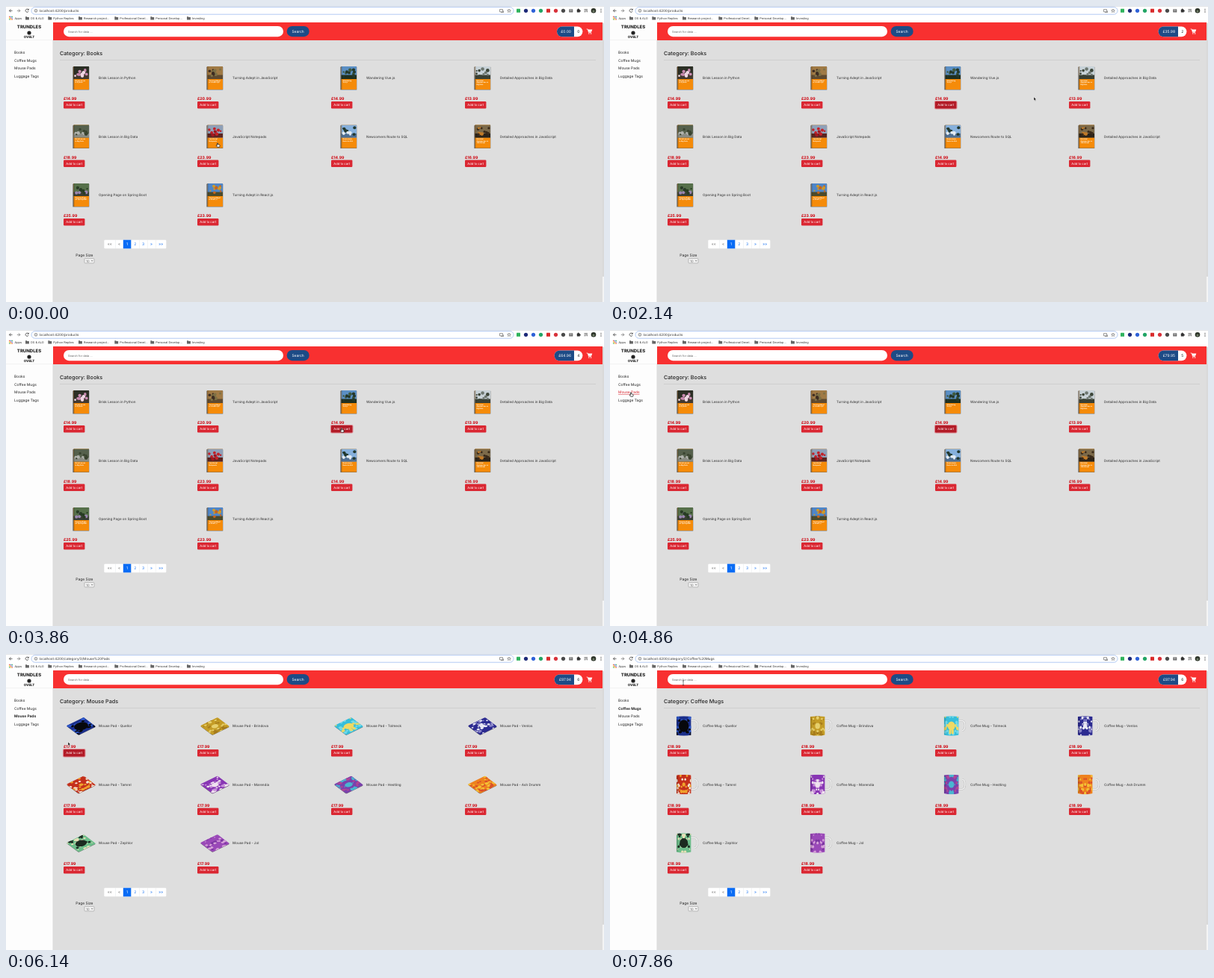
These frames come from a looping animation (800 by 397 pixels, 8 s). An HTML page:

```html
<!DOCTYPE html>
<html lang="en">
<head>
<meta charset="utf-8">
<title>Shop</title>
<style>
html, body { margin: 0; width: 100%; height: 100%; overflow: hidden; background: #fff; }
svg { display: block; width: 800px; height: 397px; }
text { font-family: Inter, "Open Sans", sans-serif; text-rendering: geometricPrecision; white-space: pre; }
</style>
</head>
<body>
<svg viewBox="0 0 800 397" xmlns="http://www.w3.org/2000/svg">
  <defs id="defs"></defs>
  <g id="chrome"></g>
  <g id="scene"></g>
</svg>
<script>
const $ = id => document.getElementById(id);
const text = (x, y, s, size, fill = '#222', more = '') =>
  `<text x="${x}" y="${y}" font-size="${size}" fill="${fill}" ${more}>${s.replace(/&/g, '&amp;').replace(/</g, '&lt;')}</text>`;
const rect = (x, y, w, h, fill, rx = 0, more = '') =>
  `<rect x="${x}" y="${y}" width="${w}" height="${h}" rx="${rx}" fill="${fill}" ${more}/>`;
const circle = (x, y, r, fill, more = '') => `<circle cx="${x}" cy="${y}" r="${r}" fill="${fill}" ${more}/>`;
const line = (d, stroke, w) => `<path d="${d}" fill="none" stroke="${stroke}" stroke-width="${w}"/>`;
const mid = 'text-anchor="middle"', bold = 'font-weight="700"';

let seed = 7;
const rnd = (a = 0, b = 1) => {
  seed = (seed * 16807) % 2147483647;
  return a + (b - a) * seed / 2147483647;
};

// title, price, then cover colours: sky, ground, foliage, focus
const books = [
  ['Brisk Lesson in Python', 14.99, '#2c2f25', '#43392f', '#c98bb0', '#f0d8e4'],
  ['Turning Adept in JavaScript', 20.99, '#a07a45', '#5f4a30', '#7d7045', '#3d2c22'],
  ['Wandering Vue.js', 14.99, '#5b8fc4', '#20301f', '#24382a', '#3f5a40'],
  ['Detailed Approaches in Big Data', 13.99, '#c8d2d8', '#3a4034', '#3c4538', '#6d7770'],
  ['Brisk Lesson in Big Data', 18.99, '#55604c', '#8a8c84', '#39432f', '#b0b2ac'],
  ['JavaScript Notepads', 23.99, '#8fa0b8', '#5a2420', '#c42028', '#a01822'],
  ['Newcomers Route to SQL', 14.99, '#86b0dc', '#4f6f92', '#22382e', '#e4ebf2'],
  ['Detailed Approaches in JavaScript', 16.99, '#7c6a4a', '#2c241a', '#3a2a1a', '#c07a28'],
  ['Opening Page on Spring Boot', 25.99, '#56704a', '#3a3f34', '#283c24', '#9a86b0'],
  ['Turning Adept in React.js', 23.99, '#4f86c8', '#4c4a2a', '#d09a28', '#c8641c']
];
// design name, then base colour, two accents, size of the centre motif
const designs = [
  ['Quellor', '#1b2f8c', '#07080c', '#2f58c8', .62],
  ['Brindova', '#c49c26', '#e6cf6c', '#a67c1c', .3],
  ['Tolmeck', '#35bedb', '#efd964', '#72d9e8', .45],
  ['Venlos', '#2b2a90', '#e9e8f4', '#8682c6', .25],
  ['Tamrel', '#c4301c', '#f0a32c', '#f5e8d6', .2],
  ['Marendia', '#8836b4', '#f0e2ef', '#c78fd8', .3],
  ['Hestling', '#7a42ac', '#48b6d0', '#b24596', .35],
  ['Ash Drumm', '#ee821e', '#f4c135', '#d94e2a', .15],
  ['Zephlor', '#6cbd8a', '#1c2a20', '#e8e0b8', .5],
  ['Jol', '#9a49b8', '#d6a0d8', '#7b36a2', .15]
];

function coverArt([title, , sky, ground, leaf, focus], i) {
  let s = rect(-1.2, .6, 22, 31, '#6b6b6b', .6) + rect(0, 0, 20.5, 31, '#f58b09', .4) +
    rect(0, 0, 20.5, 17, sky) + rect(0, 11.5, 20.5, 5.5, ground);
  for (let k = 0; k < 11; k++)
    s += circle(rnd(2, 18.5), rnd(3.5, 13.5), rnd(1, 2.4), k % 3 ? leaf : focus);
  s += rect(0, 0, .9, 31, '#0004');
  title.match(/.{1,14}(\s|$)/g).forEach((row, k) => s += text(2, 19.9 + k * 2.5, row.trim(), 2.2, '#fff', bold));
  return `<g id="book${i}">${s}</g>`;
}

// mirrored motif on a square from -1 to 1
function motif([, base, a, b, core], i) {
  let s = rect(-1.1, -1.1, 2.2, 2.2, base);
  for (let k = 0; k < 18; k++) {
    const x = rnd(), y = rnd(-1, 1), r = rnd(.06, .2), c = k % 2 ? a : b;
    s += circle(x, y, r, c) + circle(-x, y, r, c);
  }
  s += `<ellipse rx="${core * 1.1}" ry="${core}" fill="${a}"/>`;
  return `<g id="motif${i}">${s}</g>`;
}

$('defs').innerHTML = books.map(coverArt).join('') + designs.map(motif).join('') +
  `<clipPath id="mat"><rect x="-1" y="-1" width="2" height="2" rx=".14"/></clipPath>
   <clipPath id="cup"><path d="M-1-.94Q0-1.06 1-.94V.9Q0 1.1-1 .9Z"/></clipPath>
   <clipPath id="slice"><rect x="0" y="80" width="60" height="12"/></clipPath>`;

const art = {
  book: i => `<use href="#book${i}" x="13.5" y="81"/>`,
  pad: i => ['#2a2a2a88', ''].map((shade, k) =>
    `<g transform="matrix(11.6 -5.7 8.2 6.2 23.5 ${97.5 - k * .7})"><g clip-path="url(#mat)">` +
    (shade ? rect(-1, -1, 2, 2, shade) : `<use href="#motif${i}"/>`) + '</g></g>').join(''),
  mug: i => line('M31 89.5H36Q40 90 40 96T36 103H31', '#a9a9a9', 2.2) +
    line('M31 89.5H36Q40 90 40 96T36 103H31', '#f1f1f1', 1.5) +
    `<g transform="translate(21.7 96.5) scale(9.9 13.2)"><g clip-path="url(#cup)"><use href="#motif${i}"/></g></g>` +
    rect(11.9, 84.5, 2.5, 23.5, '#0002')
};

const stock = {
  book: books.map(b => [b[0], b[1]]),
  pad: designs.map(d => ['Mouse Pad - ' + d[0], 17.99]),
  mug: designs.map(d => ['Coffee Mug - ' + d[0], 18.99])
};

function browser() {
  let s = rect(0, 0, 800, 22, '#fff') + rect(0, 0, 800, .6, '#cfd3d8') +
    rect(34, 1.6, 645, 9.6, '#fff', 4.8, 'stroke="#9fbdf0" stroke-width=".8"') +
    line('M8.5 6.3H4.5M6.4 4.3L4.4 6.3L6.4 8.3', '#444', .8) +
    line('M14.8 6.3H18.8M16.9 4.3L18.9 6.3L16.9 8.3', '#777', .8) +
    line('M30 5A2.1 2.1 0 1 0 30.2 7M30.3 3.7V5.3H28.6', '#444', .8) +
    circle(40, 6.3, 1.9, 'none', 'stroke="#555" stroke-width=".6"') + line('M40 6V7.5M40 4.9V5.4', '#555', .6) +
    line('M660.5 4.6H664.5V7.8H660.5ZM662 8.6H665.5V6.5', '#555', .6) +
    line('M673 4L673.7 5.6L675.3 5.7L674 6.8L674.5 8.4L673 7.5L671.5 8.4L672 6.8L670.7 5.7L672.3 5.6Z', '#444', .5);
  ['#2fb35c', '#1d2a78', '#2f62d8', '#22a565', '#d92a2a', '#d8323a', '#4a4a4a'].forEach((c, i) =>
    s += i % 4 ? circle(685.5 + i * 10, 6.3, 2.6, c) : rect(683 + i * 10, 3.8, 5, 5, c, .4));
  s += rect(753.3, 4.2, 5, 4.4, '#666', .5) + line('M755.8 4.2V8.6M754 5.7H757.6', '#fff', .4) +
    rect(763.8, 4.6, 4, 4, '#333', .6) + circle(765.7, 4.4, .9, '#333') + circle(768, 6.6, .9, '#333') +
    line('M773.5 4.6H778M773.5 6.2H778M773.5 7.8H775.6M777.3 6.2V8.4', '#444', .7) +
    circle(786, 6.3, 3.3, '#2c3328') + circle(786, 7, 1.6, '#72806a');
  for (let k = 0; k < 3; k++) s += circle(796, 4.4 + k * 1.9, .6, '#444');
  const dots = ['#e24a3b', '#4a86e8', '#3aa757', '#f2b90c'];
  for (let k = 0; k < 9; k++) s += rect(4 + k % 3 * 1.8, 13.7 + (k / 3 | 0) * 1.8, 1.3, 1.3, dots[k % 4]);
  s += text(11.5, 17.8, 'Apps', 3.9, '#333');
  [[26, 'DS & ALG'], [56.3, 'Python Replies'], [97, 'Research project…'], [145.3, 'Professional Devel…'],
   [193.3, 'Personal Develop…'], [242, 'Investing']].forEach(([x, name]) =>
    s += `<path d="M${x} 14.2h1.8l.7.7h2.4v3.5h-4.9z" fill="#666"/>` + text(x + 7, 17.8, name, 3.9, '#333'));
  return s;
}

function frame() {
  const red = '#f83030', navy = '#1d4b86';
  let s = rect(0, 22, 63, 375, '#fdfdfd') + rect(63, 22, 735, 24, red) + rect(63, 46, 735, 351, '#dedede') +
    rect(0, 45.6, 63, .5, '#e6e6e6') + rect(62.6, 46, .5, 351, '#d2d2d2') +
    rect(798, 22, 2, 375, '#f4f4f4') + rect(798.4, 23, 1.2, 340, '#c6c6c6', .6) +
    text(31, 30.2, 'TRUNDLES', 6, '#222', mid + ' font-weight="800"') + circle(31, 36, 2.6, '#222') +
    text(31, 42.8, 'OVELT', 4.4, '#222', mid + ' font-weight="800"') +
    rect(77, 27, 294, 14.2, '#fff', 7.1) + text(83, 35.7, 'Search for data ...', 3.9, '#666') +
    rect(375.7, 27, 30, 14.2, navy, 7.1) + text(390.5, 36, 'Search', 4.9, '#fff', mid) +
    line('M776.6 31H778.3L779.5 35.5H783', '#fff', .8) +
    '<path d="M778.4 31.6H784.3L783.2 34.8H779.3Z" fill="#fff"/>' +
    circle(779.9, 37, .8, '#fff') + circle(782.6, 37, .8, '#fff') +
    rect(72, 72.3, 717, .5, '#bdbdbd');
  return s;
}
$('chrome').innerHTML = browser() + frame();

function item(kind, i, x, y, pic, lift, state) {
  const [name, price] = stock[kind][i];
  const dy = lift ? 28.5 : 0;
  let s = pic ? `<g ${pic === 'part' ? 'clip-path="url(#slice)"' : ''}>${art[kind](i)}</g>` : '';
  s += text(47, 98.1 - dy / 2, name, 4.55, '#444', 'font-weight="500"') +
    text(0, 126 - dy, '£' + price, 5.15, '#d0121c', 'font-weight="800"');
  if (state === 'focus') s += rect(-1.1, 126.9 - dy, 30.6, 11.6, '#dc354580', 2);
  s += rect(0, 128 - dy, 28.4, 9.4, state ? '#b31b27' : '#da2732', 1.2) +
    text(14.2, 134.2 - dy, 'Add to cart', 4.15, '#fff', mid);
  return `<g transform="translate(${x} ${y})">${s}</g>`;
}

function pager(y) {
  const edges = [131.3, 146, 156.8, 167.4, 178, 189, 200, 214.3];
  let s = rect(131.3, 0, 83, 11.6, '#fff', 1.2);
  ['««', '«', '1', '2', '3', '»', '»»'].forEach((label, k) => {
    const x = edges[k], w = edges[k + 1] - x, on = label === '1';
    s += (on ? rect(x, 0, w, 11.6, '#0a6cf5') : k ? rect(x, 0, .4, 11.6, '#dee2e6') : '') +
      text(x + w / 2, 7.7, label, 5, on ? '#fff' : k < 2 ? '#777' : '#1c74f0', mid);
  });
  s += text(93.3, 22.2, 'Page Size', 4.95) + rect(105, 24.9, 13, 6.3, '#f2f2f2', 1, 'stroke="#888" stroke-width=".5"') +
    text(107, 29.9, '10', 4.6, '#777') + line('M114.2 27.2L115.2 28.6L116.2 27.2', '#555', .6);
  return `<g transform="translate(0 ${y})">${s}</g>`;
}

// step, x, y of the pointer
const path = [[0, 283, 184], [1, 282, 178], [4, 270, 132], [6, 270, 132], [10, 449, 132], [13, 450, 132],
  [15, 567, 122], [18, 628, 132], [20, 628, 132], [24, 449, 132], [30, 449, 132], [34, 28, 84], [35, 28, 83],
  [36, 72.5, 89], [39, 92, 132], [41, 91, 132], [43, 83, 118], [48, 13, 69], [50, 13, 69], [54, 97, 39], [55, 98, 37]];
// step, total, count, focused button
const sales = [[0, '£0.00', 0, -1], [5, '£20.99', 1, 1], [11, '£35.98', 2, 2], [19, '£49.97', 3, 3],
  [26, '£64.96', 4, 2], [30, '£79.95', 5, 2], [35, '£79.95', 5, -1], [40, '£97.94', 6, 0], [49, '£97.94', 6, -1]];
const links = ['Books', 'Coffee Mugs', 'Mouse Pads', 'Luggage Tags'];

function pointer(n) {
  n = Math.max(0, n);
  const k = path.findIndex(p => p[0] >= n);
  if (k < 1) return path[0].slice(1);
  const [a, ax, ay] = path[k - 1], [b, bx, by] = path[k];
  const u = (n - a) / (b - a), e = u * u * (3 - 2 * u);
  return [ax + (bx - ax) * e, ay + (by - ay) * e];
}
const linkAt = ([x, y]) => x > 9 && x < 44 && y > 58 && y < 100 ? Math.floor((y - 57.5) / 10.6) : -1;
const buttonAt = ([x, y]) => y > 128 && y < 137.5 && x > 76 && (x - 77) % 179 < 28.5 ? Math.floor((x - 77) / 179) : -1;

function cursor(p) {
  const [x, y] = p;
  const overArt = x > 77 && y > 81 && y < 270 && (x - 77) % 179 > 3 && (x - 77) % 179 < 44 && (y - 81) % 78.5 < 31;
  let s;
  if (x > 77 && x < 371 && y > 27 && y < 41)
    s = line('M-1.2-1.5Q0-1.5 0-.5V4Q0 5 1.2 5M1.2-1.5Q0-1.5 0-.5M-1.2 5Q0 5 0 4', '#222', .6);
  else if (overArt || linkAt(p) >= 0 || buttonAt(p) >= 0)
    s = '<path d="M-.6 0Q0-.8.6 0V1.8L2.8 2.3Q3.3 2.5 3.2 3.2L2.6 5.2H-.4L-2 3.2Q-1.7 2.5-.6 3.2Z" fill="#fff" stroke="#111" stroke-width=".7"/>';
  else
    s = '<path d="M0 0V4.8L1.1 3.8L1.9 5.5L2.7 5.1L1.9 3.5H3.4Z" fill="#111" stroke="#fff" stroke-width=".4"/>';
  return `<g transform="translate(${x} ${y})">${s}</g>`;
}

function scene(n) {
  const p = pointer(n), hover = buttonAt(p), link = linkAt(p), lastLink = linkAt(pointer(n - 1));
  const [, total, count, focus] = sales.filter(e => e[0] <= n).pop();
  const route = n < 35 ? ['products', 'Books'] : n < 49 ? ['category/3/Mouse%20Pads', 'Mouse Pads'] :
    ['category/2/Coffee%20Mugs', 'Coffee Mugs'];
  const kind = n < 36 ? 'book' : n < 50 ? 'pad' : 'mug';
  const loading = n === 36 || n === 50;
  const active = { pad: 2, mug: 1 }[kind];

  let s = text(44.5, 8, 'localhost:4200/' + route[0], 4.55, '#333') +
    text(72, 66.2, 'Category: ' + route[1], 7.2, '#222', 'font-weight="500"');
  links.forEach((name, k) => s += text(11, 64.1 + k * 10.6, name, 4.9,
    k === link || k === active && k === lastLink ? '#d8202a' : '#222',
    (k === active ? bold : '') + (k === link ? ' text-decoration="underline"' : '')));

  const left = count ? 733.6 : 737;
  s += rect(left, 27.4, 771.4 - left, 13.8, '#fff', 6.9) +
    `<path d="M760 27.4H${left + 6.9}a6.9 6.9 0 0 0 0 13.8H760Z" fill="#1d4b86"/>` +
    text(756, 36.1, total, 5, '#fff', 'text-anchor="end"') + text(765.8, 36.1, '' + count, 5, '#222', mid);

  for (let i = 0; i < 10; i++) {
    const row = i / 4 | 0, pic = !loading || i < 1 ? 'full' : i === 1 ? 'part' : '';
    const y = row * 78.5 - (loading && row === 2 ? 28.5 : 0);
    s += item(kind, i, 77 + i % 4 * 179, y, pic, !pic, i === focus ? 'focus' : i === hover ? 'hover' : '');
  }
  return s + pager(loading ? 256.7 : 313.7) + cursor(p);
}

let shown = -1;
function tick(now) {
  const n = Math.floor((now % 8000 + 5) * 7 / 1000) % 56;
  if (n !== shown) $('scene').innerHTML = scene(shown = n);
  requestAnimationFrame(tick);
}
tick(0);
</script>
</body>
</html>
```
